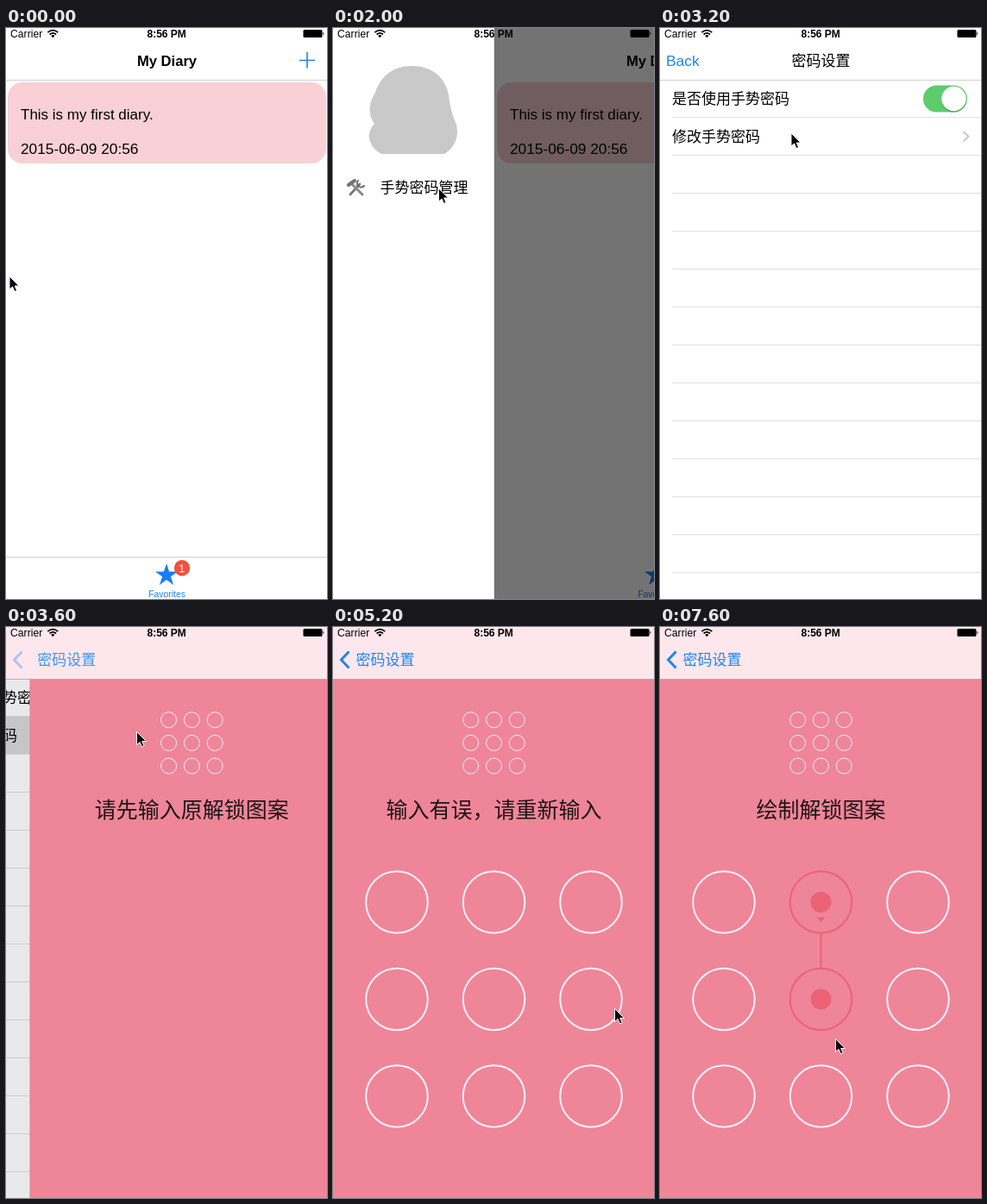
These frames come from a looping animation (372 px wide and 662 px high, 8 s). An HTML page:

```html
<!DOCTYPE html>
<html lang="zh-CN">
<head>
<meta charset="utf-8">
<title>My Diary</title>
<style>
html, body { margin: 0; width: 100%; height: 100%; overflow: hidden; background: #fff; }
svg { display: block; width: 372px; height: 662px; }
text { font-family: "Liberation Sans", Arial, sans-serif; font-size: 17px; }
.zh { font-family: "Noto Sans CJK SC", "Noto Sans CJK", sans-serif; }
.bold { font-weight: 700; }
.mid { text-anchor: middle; }
.blue { fill: #1f85e8; }
.hair { stroke: #d2d2d4; }
.prompt { font-size: 25px; fill: #1c1416; }
.ring { fill: none; stroke: #fdf1f3; stroke-width: 2; }
.small { fill: none; stroke: #fdf1f3; }
.on { fill: none; stroke: #ec6277; stroke-width: 2; }
.dot { fill: #ec6277; }
</style>
</head>
<body>
<svg viewBox="0 0 372 662" xmlns="http://www.w3.org/2000/svg">
  <g id="home">
    <rect x="-1.5" width="375" height="662" fill="#fff"/>
    <text class="bold mid" x="186.5" y="44" style="font-size:16.6px">My Diary</text>
    <path d="M340 37.5H358M349 28V46.5" stroke="#1f85e8" stroke-width="1.6"/>
    <rect x="2" y="63" width="369" height="94" rx="17" fill="#f8d0d5"/>
    <text x="17" y="106">This is my first diary.</text>
    <text x="17" y="146" style="font-size:17.3px">2015-06-09 20:56</text>
    <path id="bars" class="hair" d="M0 60.5H372M0 613.5H372"/>
    <path id="star" fill="#147efb"/>
    <circle cx="204" cy="626" r="9.2" fill="#f0533c"/>
    <text class="mid" x="203.7" y="630.8" fill="#fff" style="font-size:13px">1</text>
    <text class="mid blue" x="186.5" y="660" style="font-size:10.4px">Favorites</text>
    <rect id="dim" x="-1.5" width="375" height="662" fill="#000" opacity=".55"/>
  </g>

  <g id="menu">
    <rect width="186.5" height="662" fill="#fff"/>
    <path fill="#c9c9c9" d="M56 146C40 137 38 121 48 111C39 98 43 84 49 75C55 55 72 43 92 44C116 44 131 59 134 78C136 94 139 103 143 112C147 129 138 141 129 146Z"/>
    <g fill="none" stroke="#77736f" stroke-linecap="round">
      <path d="M20 193L31 181" stroke-width="2.6"/>
      <path d="M29 177A4.5 4.5 0 1 0 36 183" stroke-width="2.2"/>
      <path d="M22 181L34 193" stroke-width="3" stroke="#8f8a86"/>
      <path d="M18 182L25 177" stroke-width="4"/>
    </g>
    <text class="zh" x="54.5" y="191">手势密码管理</text>
  </g>

  <g id="setup">
    <rect x="-1.5" width="375" height="662" fill="#fff"/>
    <g id="list">
      <rect id="picked" x="-1.5" y="104" width="375" height="44" fill="#d9d9d9"/>
      <path id="rows" stroke="#e0e0e2"/>
      <text class="zh" x="14" y="88">是否使用手势密码</text>
      <text class="zh" x="14" y="131.5">修改手势密码</text>
      <rect x="305" y="66.5" width="51" height="31" rx="15.5" fill="#5dcd6b"/>
      <circle cx="340.5" cy="84" r="14.2" fill="#000" opacity=".16"/>
      <circle cx="340.5" cy="82" r="14.2" fill="#fff"/>
      <path d="M351.5 120L357.5 125.8L351.5 131.6" fill="none" stroke="#c7c7cc" stroke-width="2"/>
    </g>
    <rect id="shade" x="-1.5" y="60" width="375" height="602" fill="#000" opacity=".085"/>
    <g id="setupBar">
      <path class="hair" d="M0 60.5H372"/>
      <text class="blue" x="7" y="44" style="font-size:17.4px">Back</text>
      <text class="zh mid" x="186.5" y="44.3" font-weight="500">密码设置</text>
    </g>
  </g>

  <g id="lock">
    <g id="board">
      <rect x="-1.5" y="60" width="375" height="602" fill="#ef8599"/>
      <g id="mini"></g>
      <text id="prompt" class="zh mid prompt" x="186.5" y="221"></text>
      <g id="pad"></g>
    </g>
    <rect width="372" height="60" fill="#fde7ed"/>
    <path d="M0 60.5H372" stroke="#c9a3ac"/>
    <path id="arrow" d="M18.5 28.5L9.5 38L18.5 47.5" fill="none" stroke="#1f85e8" stroke-width="3"/>
    <text id="backName" class="zh blue" y="44.3">密码设置</text>
  </g>

  <g id="status">
    <text x="5" y="10.7" style="font-size:12.2px">Carrier</text>
    <g fill="none" stroke="#000" stroke-width="1.7">
      <path d="M48.3 5.2Q54.3 0 60.3 5.2M50.6 7.5Q54.3 4.3 58 7.5"/>
    </g>
    <path d="M52.2 8.9Q54.3 7.2 56.4 8.9L54.3 11.2Z"/>
    <text class="bold mid" x="186.2" y="10.5" style="font-size:12px">8:56 PM</text>
    <rect x="344.5" y="2" width="22" height="9" rx="1.5"/>
    <path d="M367.4 4.6Q369.4 6.5 367.4 8.4Z"/>
  </g>

  <path id="cursor" d="M0 0V15.2L3.5 12L6 17.5L8.6 16.4L6.2 11H11Z" stroke="#fff" stroke-width="1"/>
</svg>

<script>
const STEP = 400;
const ASK = "请先输入原解锁图案", WRONG = "输入有误，请重新输入", DRAW = "绘制解锁图案";
const OPEN = 188;

// One entry per step: cursor position and the screen state.
const home = (x, y, slide = 0) => ({ x, y, slide });
const setup = (x, y, drop = 0) => ({ x, y, slide: OPEN, drop });
const lock = (x, y, msg, picks = "", push = 1, pad = true) =>
  ({ x, y, slide: OPEN, drop: 0, msg, picks, push, pad });

const steps = [
  home(4, 288), home(184, 307), home(183, 308, 134), home(183, 308, OPEN),
  home(122.5, 186, OPEN), home(122.5, 186, OPEN),
  setup(122, 190, 2), setup(121, 196), setup(152, 122),
  lock(151.5, 121.5, ASK, "", 0.923, false),
  lock(110, 240, ASK), lock(60, 412, ASK), lock(200, 459, ASK, "45"),
  lock(326.5, 442.5, WRONG), lock(64, 290, WRONG), lock(270, 432, WRONG, "145"),
  lock(360, 434, DRAW), lock(196, 341, DRAW), lock(166, 312, DRAW),
  lock(203.5, 477.5, DRAW, "25")
];

const $ = id => document.getElementById(id);
const move = (id, x, y = 0) => $(id).setAttribute("transform", `translate(${x} ${y})`);
const show = (id, on) => $(id).setAttribute("visibility", on ? "visible" : "hidden");
const fade = (id, v) => $(id).setAttribute("opacity", v);
const mix = (a, b, p) => a + (b - a) * p;
const circle = (x, y, r, cls) => `<circle cx="${x}" cy="${y}" r="${r}" class="${cls}"/>`;
const spot = n => [74 + 112.5 * (n % 3), 319 + 112.5 * Math.floor(n / 3)];

function starPath() {
  const pts = Array.from({ length: 10 }, (_, i) => {
    const a = i * Math.PI / 5, r = i % 2 ? 5.2 : 13.8;
    return (186 + r * Math.sin(a)).toFixed(1) + " " + (634.5 - r * Math.cos(a)).toFixed(1);
  });
  return "M" + pts.join("L") + "Z";
}

function padMarkup(picks) {
  const path = [...picks].map(c => c - 1);
  let out = "";
  for (let n = 0; n < 9; n++) {
    const [x, y] = spot(n);
    const on = path.includes(n);
    out += circle(x, y, 35.8, on ? "on" : "ring");
    if (on) out += circle(x, y, 12, "dot");
  }
  path.slice(1).forEach((n, i) => {
    const [x, y] = spot(path[i]), [u, v] = spot(n);
    const len = Math.hypot(u - x, v - y);
    const turn = Math.atan2(v - y, u - x) * 180 / Math.PI;
    out += `<g transform="translate(${x} ${y}) rotate(${turn})">` +
      `<path class="on" d="M36.5 0H${len - 36.5}"/>` +
      `<path class="dot" d="M17.5 -4.5V4.5L23.5 0Z"/></g>`;
  });
  return out;
}

function build() {
  $("star").setAttribute("d", starPath());
  let rows = "", mini = "";
  for (let y = 103.5; y < 640; y += 44) rows += `M14 ${y}H375`;
  $("rows").setAttribute("d", rows);
  for (let n = 0; n < 9; n++)
    mini += circle(159.7 + 26.8 * (n % 3), 107.7 + 26.7 * Math.floor(n / 3), 9, "small");
  $("mini").innerHTML = mini;
}

function draw(s) {
  const inSetup = s.drop !== undefined, inLock = !!s.msg;
  move("cursor", s.x, s.y);
  move("home", s.slide);
  move("menu", s.slide - OPEN);
  show("dim", s.slide > 0);
  show("bars", s.slide === 0);
  show("menu", s.slide > 0);
  show("setup", inSetup);
  move("setup", 0, s.drop || 0);
  const p = inLock ? s.push : 0;
  move("list", -111.6 * p);
  for (const id of ["picked", "shade"]) $(id).style.display = inLock ? "" : "none";
  $("setupBar").style.display = inLock ? "none" : "";
  $("lock").style.display = inLock ? "" : "none";
  if (!inLock) return;
  move("board", 375 * (1 - p));
  $("prompt").textContent = s.msg;
  $("pad").innerHTML = s.pad ? padMarkup(s.picks) : "";
  $("backName").setAttribute("x", mix(152.5, 26.5, p));
  fade("arrow", p < 1 ? 0.35 : 1);
  fade("backName", p < 1 ? 0.85 : 1);
}

let last = -1;
const start = performance.now();
function tick() {
  const i = Math.floor((performance.now() - start) / STEP) % steps.length;
  if (i !== last) draw(steps[last = i]);
  requestAnimationFrame(tick);
}
build();
tick();
</script>
</body>
</html>
```
